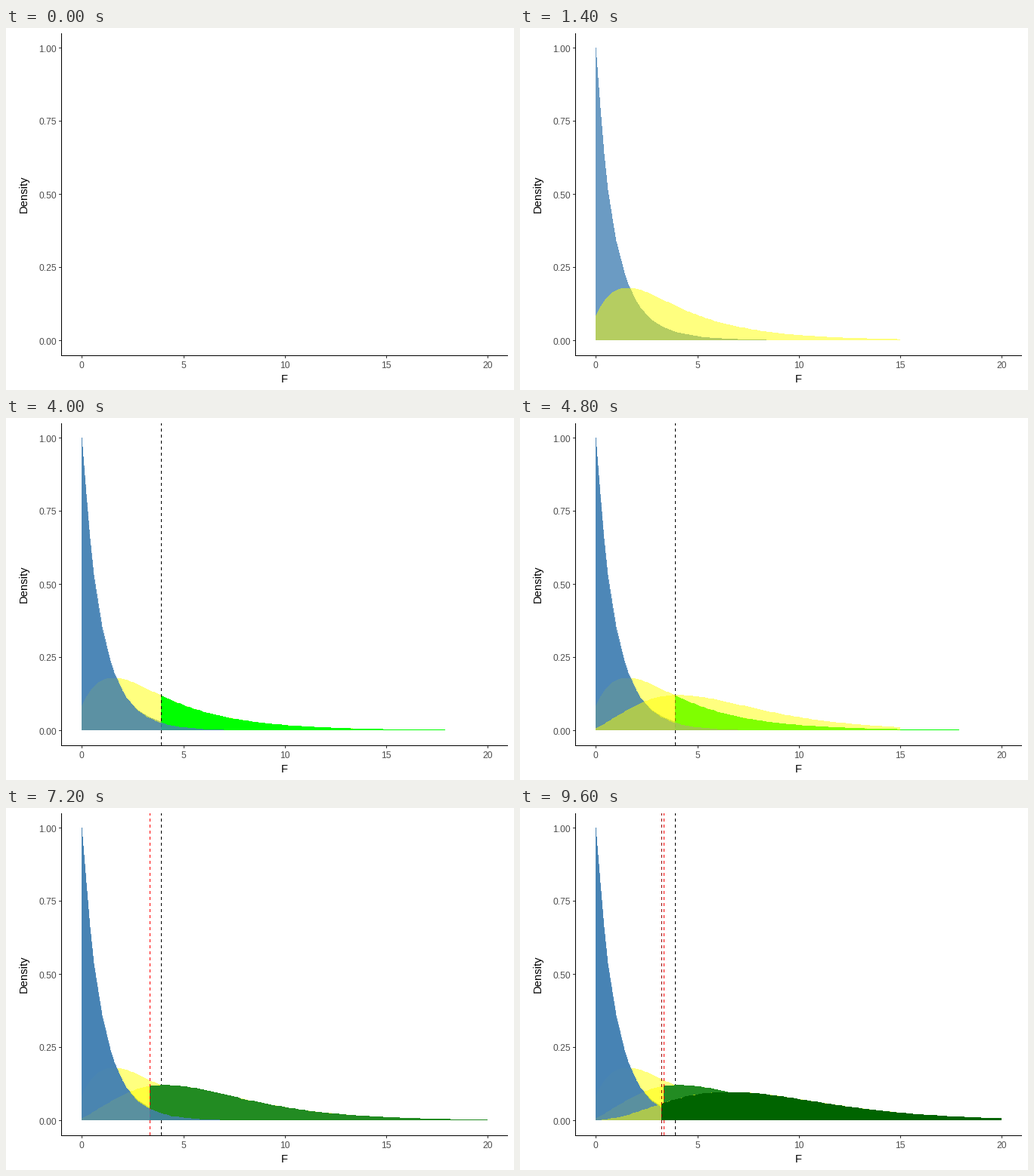
A matplotlib script that plays this animation: 672x480 px, repeating every 10000 ms.

```python
import math

import matplotlib.pyplot as plt
import numpy as np
from matplotlib.animation import FuncAnimation
from matplotlib.patches import Polygon, Rectangle

plt.rcParams["font.family"] = "Liberation Sans"

W, H, DPI = 672, 480, 96
STEP_MS, LOOP_MS = 100, 10000
LEFT, RIGHT, TOP, BOTTOM = 73, 664, 7, 434
X_ZERO, X_UNIT = 100.3, 26.85
Y_ZERO, Y_UNIT = 414.42, 388.0

fig = plt.figure(figsize=(W / DPI, H / DPI), dpi=DPI, facecolor="white")
ax = fig.add_axes([0, 0, 1, 1])
ax.set_xlim(0, W)
ax.set_ylim(H, 0)
ax.axis("off")


def px(x):
    return np.rint(X_ZERO + X_UNIT * np.asarray(x))


def py(y):
    return np.rint(Y_ZERO - Y_UNIT * np.asarray(y))


def f_density(x, df, ncp=0.0):
    """Density of the (noncentral) F distribution with 2 and df degrees of freedom."""
    r = 2 * x / df
    total = np.zeros_like(x)
    weight = math.exp(-ncp / 2)
    for j in range(60):
        beta = math.exp(math.lgamma(j + 1) + math.lgamma(df / 2)
                        - math.lgamma(j + 1 + df / 2))
        total += weight * 2 / df / beta * r**j * (1 + r) ** (-(1 + j + df / 2))
        weight *= ncp / 2 / (j + 1)
    return total


def critical_value(df, alpha=0.05):
    return df / 2 * (alpha ** (-2 / df) - 1)


def box(x, y, w, h, color):
    return ax.add_patch(Rectangle((x, y), w, h, fc=color, ec="none", lw=0,
                                  antialiased=False))


def area(lo, hi, df, ncp, color, alpha=1.0):
    x = np.linspace(lo, hi, 101)
    top = np.column_stack([px(x), py(f_density(x, df, ncp))])
    base = [(px(hi), py(0)), (px(lo), py(0))]
    shape = Polygon(np.vstack([top, base]), closed=True, fc=color, ec="none",
                    lw=0, alpha=alpha, antialiased=False, snap=False)
    return [ax.add_patch(shape)]


def dashed_line(x, color, dash=4):
    col = px(x)
    ends = range(BOTTOM, TOP, -2 * dash)
    return [box(col, max(end - dash, TOP), 1, min(dash, end - TOP), color)
            for end in ends]


def draw_axes():
    box(LEFT, TOP, 1, BOTTOM - TOP + 1, "black")
    box(LEFT, BOTTOM, RIGHT - LEFT, 1, "black")
    small = dict(fontsize=9, color="#4d4d4d", va="baseline")
    large = dict(fontsize=11.1, color="black", ha="center", va="baseline")
    for v in (0, 0.25, 0.5, 0.75, 1):
        y = py(v)
        box(LEFT - 3, y, 3, 1, "#333333")
        ax.text(67, y + 5.5, f"{v:.2f}", ha="right", **small)
    for v in (0, 5, 10, 15, 20):
        x = px(v)
        box(x, BOTTOM + 1, 1, 3, "#333333")
        ax.text(x, 451, str(v), ha="center", **small)
    ax.text(368.5, 470, "F", **large)
    ax.text(28, 220, "Density", rotation=90, rotation_mode="anchor", **large)


draw_axes()

# Each sample size adds: null curve, alternative curve, power region, cutoff.
GROUPS = [
    (12, 5, "#00ff00", "black", (500, 1400, 2300, 3200)),
    (27, 10, "forestgreen", "red", (4000, 4800, 5600, 6400)),
    (42, 15, "darkgreen", "darkred", (7200, 8000, 8800, 9600)),
]

layers = []
for df, ncp, green, line_color, starts in GROUPS:
    crit = critical_value(df)
    parts = [
        area(0, 20, df, 0, "steelblue", 0.8),
        area(0, 15, df, ncp, "yellow", 0.5),
        area(crit, 20, df, ncp, green),
        dashed_line(crit, line_color),
    ]
    layers += zip(starts, parts)


def update(frame):
    now = frame * STEP_MS
    for start, artists in layers:
        for artist in artists:
            artist.set_visible(now >= start)
    return []


anim = FuncAnimation(fig, update, frames=LOOP_MS // STEP_MS, interval=STEP_MS,
                     repeat=True, repeat_delay=0, blit=False)
plt.show()
```
